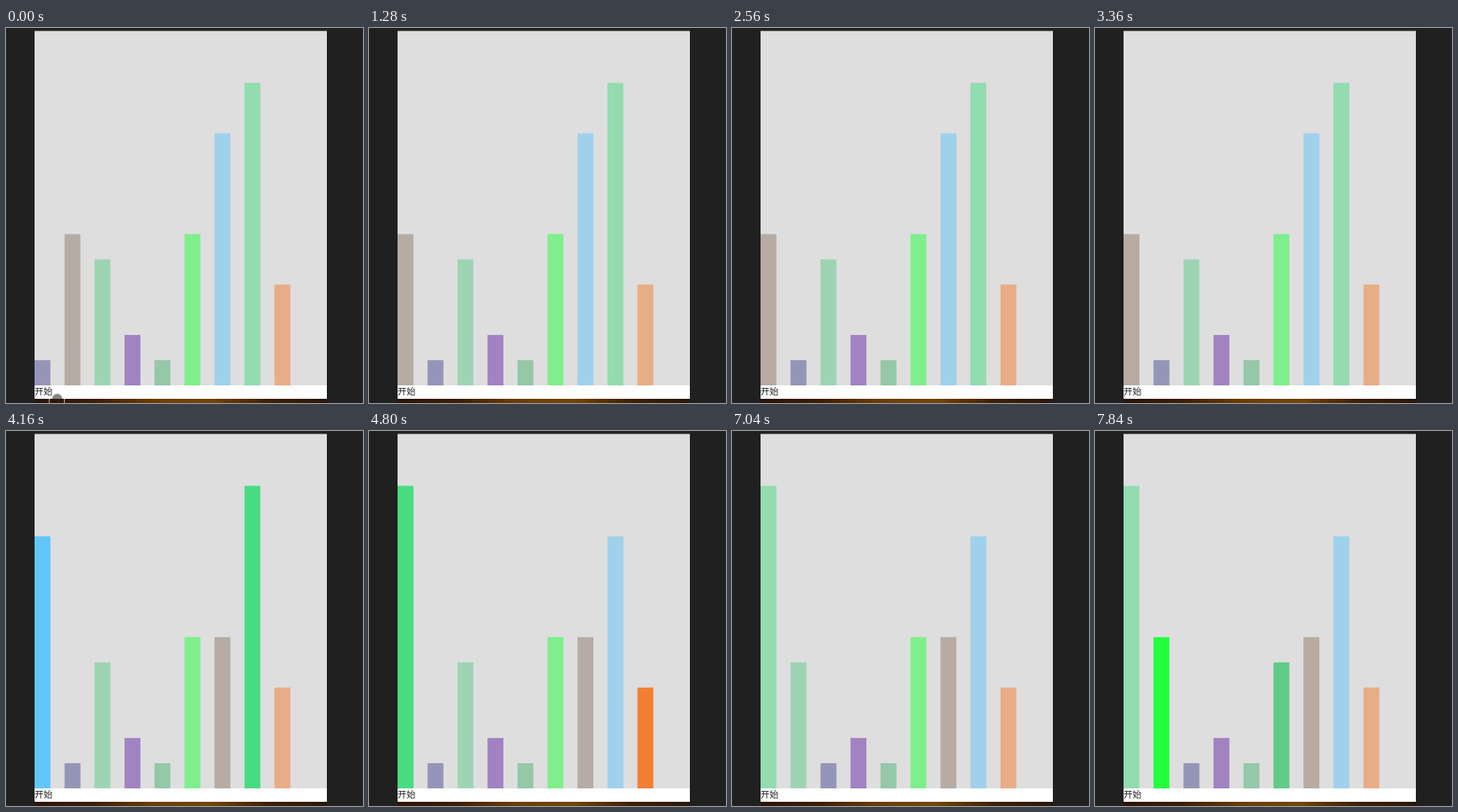
Write an HTML page with a canvas that moves like this. It is 425x447 px and loops after 8000 ms.

```html
<!DOCTYPE html>
<html lang="zh">
<head>
<meta charset="utf-8">
<title>排序</title>
<style>
  html, body { margin: 0; width: 100%; height: 100%; overflow: hidden; background: #202021; }
  canvas { display: block; }
</style>
</head>
<body>
<canvas width="425" height="447"></canvas>
<script>
const ctx = document.querySelector('canvas').getContext('2d');

const LOOP = 8000, TICK = 160;
const START = 200, STEP = 640, COMPARE = 300, MOVE = 300;
const LEFT = 34, BASE = 426, PITCH = 35.7, BAR = 18.9, UNIT = 30.05;

// [value, colour] of each bar, left to right
const bars = [
  [1, '#4f4f96'], [6, '#907c6c'], [5, '#5fcb89'], [2, '#662aa8'], [1, '#4eb276'],
  [6, '#23ff3c'], [10, '#62c6fa'], [12, '#48dc82'], [4, '#f27e32'],
];

// Exchange sort, largest first: one entry per comparison
const steps = [];
const order = bars.slice();
for (let i = 0; i < order.length; i++) {
  for (let j = i + 1; j < order.length; j++) {
    const swap = order[j][0] > order[i][0];
    steps.push({ i, j, swap, order: order.slice() });
    if (swap) [order[i], order[j]] = [order[j], order[i]];
  }
}

// cubic-bezier(.25, .1, .25, 1)
function ease(x) {
  if (x <= 0) return 0;
  if (x >= 1) return 1;
  const curve = (s, a, b) => 3 * s * (1 - s) ** 2 * a + 3 * s * s * (1 - s) * b + s ** 3;
  let lo = 0, hi = 1;
  for (let n = 0; n < 20; n++) {
    const mid = (lo + hi) / 2;
    if (curve(mid, .25, .25) < x) lo = mid; else hi = mid;
  }
  return curve(lo, .1, 1);
}

function rect(color, x, y, w, h) {
  ctx.fillStyle = color;
  ctx.fillRect(x, y, w, h);
}

const wood = ctx.createLinearGradient(LEFT, 0, 382, 0);
['#2a1407', '#3a1d06', '#6b3c02', '#744402', '#3c2005', '#2a1709']
  .forEach((color, n, all) => wood.addColorStop(n / (all.length - 1), color));

function drawStage(t) {
  rect('#202021', 0, 0, 425, 447);
  rect('#dedede', LEFT, 3.5, 348, BASE - 3.5);
  rect('#fff', LEFT, BASE, 348, 16);
  rect(wood, LEFT, 442, 348, 5);
  ctx.fillStyle = '#222';
  ctx.font = '10.7px "Noto Sans CJK SC", "Noto Sans CJK", sans-serif';
  ctx.fillText('开始', LEFT, 437.3);
  if (t < TICK) {
    ctx.fillStyle = '#858585';
    ctx.beginPath();
    ctx.arc(61, 442, 6, Math.PI, 0);
    ctx.fill();
    rect('#aaa', 51, 442, 1, 5);
    rect('#aaa', 69, 442, 1, 5);
  }
}

function drawBars(t) {
  const k = Math.floor((t - START) / STEP);
  const { i, j, swap, order } = steps[Math.max(k, 0)];
  const phase = t - START - k * STEP;
  const lit = k >= 0 && (swap || phase < COMPARE);
  const shift = k >= 0 && swap ? (j - i) * ease((phase - COMPARE) / MOVE) : 0;
  order.forEach(([value, color], n) => {
    const slot = n === i ? n + shift : n === j ? n - shift : n;
    ctx.globalAlpha = lit && (n === i || n === j) ? 1 : .5;
    rect(color, LEFT + slot * PITCH, BASE - value * UNIT, BAR, value * UNIT);
  });
  ctx.globalAlpha = 1;
}

function frame() {
  const t = Math.floor(performance.now() % LOOP / TICK) * TICK;
  drawStage(t);
  drawBars(t);
  requestAnimationFrame(frame);
}
frame();
</script>
</body>
</html>
```
